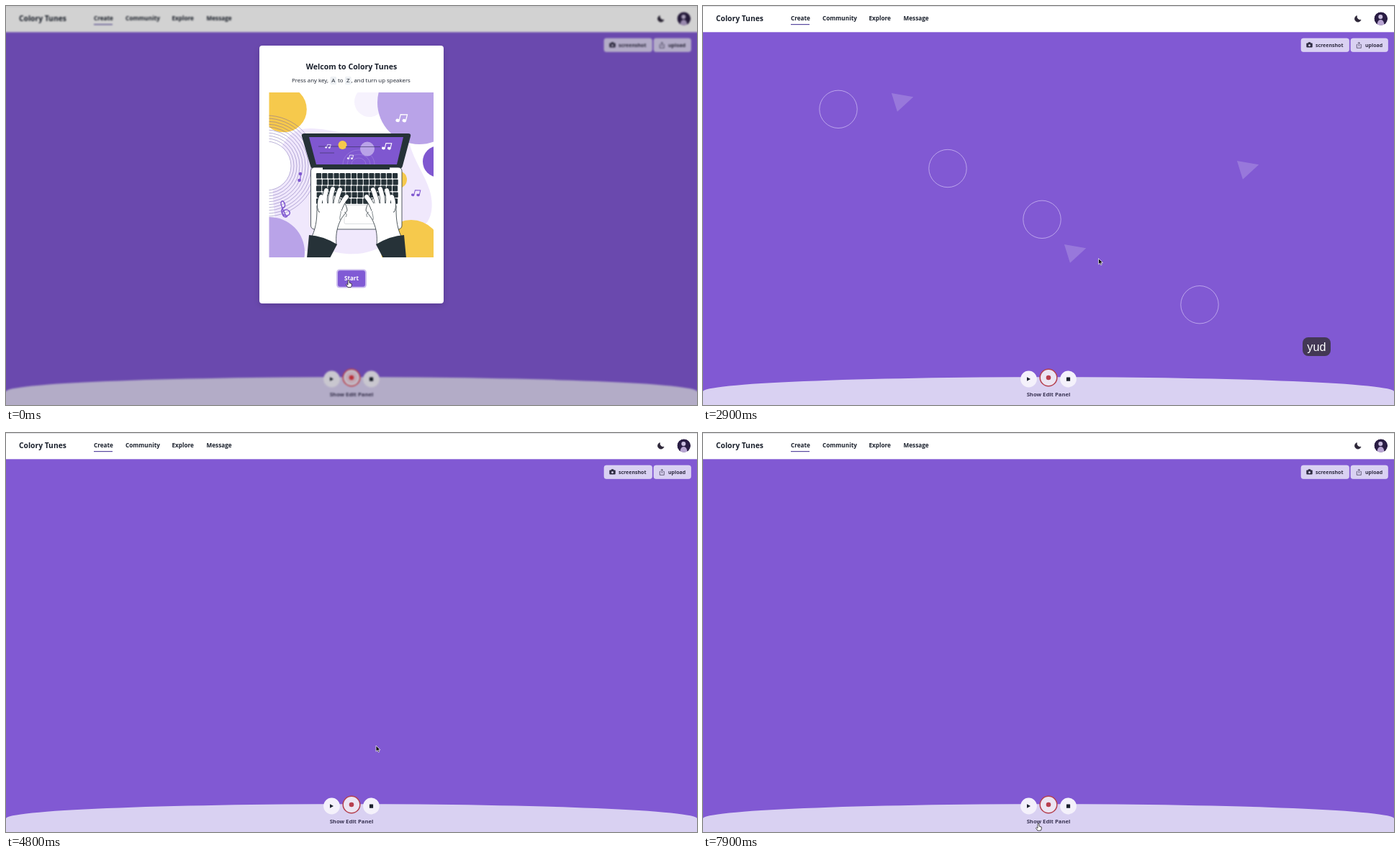
An HTML page with a canvas that plays this animation: 960x554 px, repeating every 8 s.

```html
<!DOCTYPE html>
<html lang="en">
<head>
<meta charset="utf-8">
<title>Colory Tunes</title>
<style>
  html, body { margin: 0; width: 100%; height: 100%; overflow: hidden; background: #8159d3; }
  #stage { position: relative; width: 960px; height: 554px; overflow: hidden; background: #8159d3; }
  canvas, svg { position: absolute; left: 0; top: 0; }
  text { font-family: "Open Sans", "Noto Sans", sans-serif; fill: #1a202c; }
  .bold { font-weight: 700; }
  .mid { text-anchor: middle; }
  .keys {
    position: absolute; left: 833px; height: 26px; padding: 0 6.3px; border-radius: 8px;
    background: rgba(47, 46, 43, .75); color: #fff; white-space: pre;
    font: 16.2px/27px "Liberation Sans", Arial, sans-serif;
  }
</style>
</head>
<body>
<div id="stage">
  <canvas id="fx" width="960" height="554"></canvas>
  <svg id="ui" width="960" height="554" viewBox="0 0 960 554">
    <defs>
      <clipPath id="art"><rect x="365.500" y="120" width="228.500" height="229"/></clipPath>
      <clipPath id="face"><circle cx="941.800" cy="17.600" r="9.400"/></clipPath>
      <filter id="soft" x="-20%" y="-20%" width="140%" height="140%">
        <feGaussianBlur stdDeviation="4"/>
      </filter>
      <g id="note" transform="rotate(14)">
        <ellipse cx="-4" cy="4" rx="2.800" ry="2.200"/><ellipse cx="5" cy="2" rx="2.800" ry="2.200"/>
        <path d="M-2 4V-5L7-7V2" fill="none" stroke="currentColor" stroke-width="1.300"/>
      </g>
      <g id="hand">
        <path d="M425 320C432 305 432 291 432 278C434 266 445 261 456 263C466 266 474 276 474 284C470 290 466 294 464 299C459 310 458 320 459 332Z"
          fill="#fff" stroke="#263238" stroke-width=".8"/>
        <g id="fingers" fill="none" stroke-linecap="round">
          <path d="M437 283Q434 274 438 265M444 278Q441 267 445 256M451 276Q450 265 454 254M458 276Q460 264 464 255M463 283Q467 272 473 265"/>
        </g>
        <path d="M436 274H466V288H436Z" fill="#fff"/>
        <path d="M464 297C463 292 466 288 465 285M470 286Q475 289 472 293" fill="none" stroke="#263238" stroke-width=".6"/>
        <path d="M421 318Q440 319 460 331L450 350H418Z" fill="#263238"/>
      </g>
    </defs>

    <g id="page">
      <path d="M-10 570V535.200H0A480 20 0 0 1 960 535.200H970V570Z" fill="#f7fafc" fill-opacity=".75"/>
      <rect x="-10" y="-10" width="980" height="46.300" fill="#fff"/>
      <rect x="-10" width="980" height="1" fill="#dedee2"/>
      <text class="bold" x="18" y="21" font-size="10.300">Colory Tunes</text>
      <g class="bold" font-size="8.200">
        <text x="122" y="20.300">Create</text>
        <text x="166" y="20.300">Community</text>
        <text x="230.500" y="20.300">Explore</text>
        <text x="278.500" y="20.300">Message</text>
      </g>
      <rect x="122" y="25" width="26" height="1.200" fill="#5a4aa0"/>
      <path d="M908.300 13.600A4.400 4.400 0 1 0 914 19.300A4.800 4.800 0 0 1 908.300 13.600Z"
        fill="#2d2638" stroke="#2d2638" stroke-width=".8" stroke-linejoin="round"/>
      <g clip-path="url(#face)">
        <circle cx="941.800" cy="17.600" r="9.400" fill="#2a1d44"/>
        <circle cx="941.300" cy="15" r="3" fill="#cbbfe0"/>
        <path d="M936.500 28Q936.500 19 941.500 19T946.500 28Z" fill="#b9a6d3"/>
      </g>

      <g fill="#f7fafc" fill-opacity=".75" stroke="#e4dcf8" stroke-width=".6">
        <rect x="831" y="45" width="66.500" height="18.500" rx="3"/>
        <rect x="900" y="45" width="51.500" height="18.500" rx="3"/>
      </g>
      <rect x="838.300" y="51.500" width="8.400" height="6" rx="1" fill="#2d2a40"/>
      <rect x="840.800" y="50.300" width="3.400" height="2" rx=".6" fill="#2d2a40"/>
      <circle cx="842.500" cy="54.600" r="1.700" fill="#d9d2f0" stroke="#2d2a40" stroke-width=".4"/>
      <path d="M909.500 53.500H908.300V58.300H914.300V53.500H913M911.300 56V50.300M909.600 52L911.300 50.300L913 52"
        fill="none" stroke="#4a4560" stroke-width=".8"/>
      <g class="bold" font-size="7">
        <text x="851" y="56.500" style="fill:#2d2a40">screenshot</text>
        <text x="920" y="56.500" style="fill:#2d2a40">upload</text>
      </g>

      <g fill="#f4f1fb">
        <circle cx="452.500" cy="518" r="11.400"/>
        <circle cx="507.500" cy="518" r="11.400"/>
      </g>
      <path d="M450 515.300L455 518L450 520.800Z" fill="#1a202c"/>
      <rect x="504.900" y="515.500" width="5.200" height="5.200" rx=".5" fill="#1a202c"/>
      <circle id="ring" cx="480" cy="516" r="11.800" fill="#ece5f3" stroke-width="1.500"/>
      <circle id="glow" cx="480" cy="516" r="8" fill="#f26d7d"/>
      <circle id="dot" cx="480" cy="516" r="3.300"/>
      <text class="bold mid" x="480" y="542.300" font-size="7.700" style="fill:#3b3555">Show Edit Panel</text>
    </g>

    <text id="hint" class="mid" x="480" y="226" font-size="6.700" style="fill:#fff">Press A to Z, and turn up speakers</text>

    <g id="tip">
      <rect x="478.500" y="534.500" width="57.500" height="14.500" rx="1.500" fill="#718096"/>
      <text class="mid" x="507" y="544.300" font-size="6.900" style="fill:#fff">stop recording</text>
    </g>

    <g id="modal">
      <rect width="960" height="554" fill-opacity=".175"/>
      <rect x="352" y="58" width="256" height="357" rx="4" fill-opacity=".17" filter="url(#soft)"/>
      <rect x="352" y="55" width="256" height="358" rx="4" fill="#fff"/>
      <text class="bold mid" x="480" y="88" font-size="10.600">Welcom to Colory Tunes</text>
      <g fill="#edf0f3">
        <rect x="450.500" y="98" width="8.600" height="11" rx="1.500"/>
        <rect x="471" y="98" width="8.600" height="11" rx="1.500"/>
      </g>
      <g font-size="7.900">
        <text x="397" y="106.300">Press any key,</text>
        <text class="mid" x="454.800" y="106.300">A</text>
        <text x="461" y="106.300">to</text>
        <text class="mid" x="475.200" y="106.300">Z</text>
        <text x="479.500" y="106.300">, and turn up speakers</text>
      </g>

      <g clip-path="url(#art)">
        <path d="M392 182C410 162 440 172 470 176L560 190C572 230 596 250 591 285C585 318 560 305 535 325C500 352 470 345 440 338C395 350 375 320 372 280C368 240 372 205 392 182Z" fill="#f0e8fc"/>
        <circle cx="505" cy="133" r="21" fill="#f6f2fd"/>
        <circle cx="386" cy="143.500" r="31.800" fill="#f6c94c"/>
        <circle cx="574" cy="134" r="58" fill="#b9a3e8"/>
        <circle cx="601" cy="216" r="22" fill="#7f57d0"/>
        <circle cx="545" cy="241" r="12" fill="#f6c94c"/>
        <circle cx="563" cy="339" r="42" fill="#f6c94c"/>
        <circle cx="366" cy="342" r="49" fill="#b9a3e8"/>
        <circle cx="362" cy="222" r="34" fill="#fff"/>
        <g id="waves" fill="none" stroke="#6a58a8" stroke-width=".45"></g>

        <path d="M414 177H559Q563 177 562 181L551 222Q550 226 546 226H428Q424 226 423 222L411 181Q410 177 414 177Z" fill="#263238"/>
        <path d="M421 182H552L543 220H431Z" fill="#7f57d0"/>
        <g fill="none" stroke="#a98fe0" stroke-width=".5">
          <path d="M480 220A10 9 0 0 1 500 220M474 220A16 14 0 0 1 506 220M468 220A22 20 0 0 1 512 220"/>
        </g>
        <circle cx="467.500" cy="193" r="6" fill="#f6c94c"/>
        <circle cx="502" cy="198.500" r="10" fill="#b9a3e8"/>
        <path d="M434 195H462M472 195.500H520M436 204H456" stroke="#3d3466" stroke-width=".7"/>
        <rect x="423.500" y="224" width="126.500" height="86" rx="5" fill="#fff" stroke="#263238" stroke-width=".8"/>
        <rect x="440" y="223" width="93" height="4" fill="#263238"/>
        <g id="board" fill="#263238"></g>
        <rect x="470" y="276.500" width="44" height="26" rx="2" fill="#fff" stroke="#b8bcc2" stroke-width=".5"/>
        <use href="#hand"/>
        <use href="#hand" transform="translate(974) scale(-1 1)"/>

        <g fill="#fff" color="#fff">
          <use href="#note" x="549" y="156"/>
          <use href="#note" transform="translate(528.500 195) scale(.85)"/>
          <use href="#note" transform="translate(478 210) scale(.55)"/>
          <use href="#note" transform="translate(447 195) scale(.5)"/>
        </g>
        <g fill="#7f57d0" color="#7f57d0">
          <use href="#note" transform="translate(569 260) scale(.8)"/>
          <circle cx="409" cy="233" r="2.300"/><circle cx="407.500" cy="242" r="2.300"/>
          <path d="M409 233V242" stroke="currentColor"/>
        </g>
        <path d="M391 292C386 296 381 287 386 284C393 280 398 289 391 291C382 291 380 283 387 279C389 275 384 267 382 273C381 278 389 289 389 293"
          fill="none" stroke="#7f57d0" stroke-width="1.500"/>
      </g>

      <rect x="459" y="365.500" width="42" height="26" rx="4.500" fill="#cbbcee"/>
      <rect x="461" y="367.300" width="38" height="22.400" rx="3" fill="#805ad5"/>
      <text class="bold mid" x="480" y="381.300" font-size="8" style="fill:#fff">Start</text>
    </g>

    <g id="arrow">
      <path d="M0 0V8.200L2 6.500L3.300 9.300L4.700 8.600L3.400 6H6Z" fill="#111" stroke="#fff" stroke-width=".7"/>
      <g id="block" fill="none" stroke="#8f8b9c" stroke-width="1">
        <circle cx="4.500" cy="13" r="4"/><path d="M1.700 10.200L7.300 15.800"/>
      </g>
    </g>
    <path id="point" d="M-1 .7Q0-.4 1 .7V4L4.200 5V8L3.200 10H-1.200L-3.500 6.500L-2.500 5.500L-1 6.800Z"
      fill="#fff" stroke="#222" stroke-width=".8"/>
  </svg>
  <div class="keys" id="upper" style="top:428px"></div>
  <div class="keys" id="lower" style="top:460px"></div>
</div>

<script>
const LOOP = 8000;
const $ = id => document.getElementById(id);
const g = $('fx').getContext('2d');
const clamp = v => Math.max(0, Math.min(1, v));
const span = (t, a, b) => clamp((t - a) / (b - a));
const smooth = p => p * p * (3 - 2 * p);
const out = p => 1 - (1 - p) * (1 - p);
const show = (id, alpha) => $(id).setAttribute('opacity', alpha);

// Static repeats of the illustration
for (let r = 34; r <= 70; r += 4)
  $('waves').innerHTML += `<circle cx="362" cy="222" r="${r}"/>`;
for (let row = 0; row < 5; row++)
  for (let col = 0; col < 14; col++)
    $('board').innerHTML += `<rect x="${431 + col * 8.15 + (row % 2) * .6}" y="${232 + row * 8.8}" width="7.2" height="7.6" rx="1"/>`;
const fingers = $('fingers').innerHTML;
$('fingers').innerHTML = `<g stroke="#263238" stroke-width="7.4">${fingers}</g><g stroke="#fff" stroke-width="6">${fingers}</g>`;

// Effects: each draws itself from its progress p
const TOP = 36, FOOT = 554, SLOPE = 519 / 960;

const effects = {
  wipe(p) {
    const h = FOOT - TOP, rise = p * 2;
    g.fillStyle = '#f6c94c';
    if (rise < 1) {
      g.globalAlpha = Math.min(1, rise * 1.06);
      g.fillRect(0, FOOT - h * rise, 960, h * rise);
    } else {
      const left = 2 - rise;
      g.globalAlpha = Math.sqrt(left);
      g.fillRect(0, TOP, 960, h * left);
    }
  },
  rings(p, xs) {
    const r = 81 * out(p);
    g.globalAlpha = p < .6 ? .85 : .85 * (1 - p) / .4;
    g.strokeStyle = '#d9c9f8';
    g.lineWidth = r * .03;
    for (const x of xs) circle(x, x * SLOPE + 41.7, r, 'stroke');
  },
  dots(p, xs) {
    g.globalAlpha = 1 - p;
    g.fillStyle = '#f6c94c';
    for (const x of xs) circle(x, x * SLOPE + 58, 36.3 * Math.sin(Math.PI * p), 'fill');
  },
  triangles(p, spots) {
    const grow = out(clamp(p / .3));
    g.globalAlpha = .19 * clamp((1 - p) / .25);
    g.fillStyle = '#fff';
    for (const [x, y] of spots) {
      g.save();
      g.translate(x + 13, y + 11);
      g.rotate((grow - 1) * 1.6);
      g.scale(grow, grow);
      g.beginPath();
      g.moveTo(-13, -11);
      g.lineTo(18, -4);
      g.lineTo(-6, 16);
      g.fill();
      g.restore();
    }
  },
  line(p, [x1, y1, x2, y2]) {
    const head = clamp(p * 2), tail = clamp(p * 2 - 1);
    const at = k => [x1 + (x2 - x1) * k, y1 + (y2 - y1) * k];
    g.globalAlpha = .75;
    g.strokeStyle = '#4d4089';
    g.lineWidth = 2.5;
    g.beginPath();
    g.moveTo(...at(tail));
    g.lineTo(...at(head));
    g.stroke();
  }
};

function circle(x, y, r, paint) {
  g.beginPath();
  g.arc(x, y, r, 0, 7);
  g[paint]();
}

// [start, duration, effect, data]
const score = [
  [2740, 650, 'triangles', [[262, 120], [502, 330], [742, 214]]],
  [2830, 400, 'rings', [188, 340, 471, 690]],
  [2960, 300, 'dots', [250, 530]],
  [3571, 406, 'wipe'],
  [3620, 406, 'wipe'],
  [3560, 300, 'dots', [413]],
  [3601, 400, 'rings', [213.5, 252, 367, 415, 636]],
  [3727, 300, 'dots', [307, 422]],
  [3812, 400, 'rings', [300, 358, 444, 607, 617]],
  [5180, 400, 'rings', [230, 395, 588]],
  [5260, 300, 'dots', [320, 610]],
  [5420, 650, 'triangles', [[550.5, 175], [838, 252.5], [646, 490.5]]],
  [6820, 650, 'triangles', [[837.5, 86.5], [501.5, 211], [213.5, 278], [309.5, 376.5]]],
  [6890, 460, 'line', [368, 36, 144, 557.5]]
];

// Typed keys: [start, text above, text below]
const typed = [
  [0, '', ''], [2740, '', 'y'], [2830, '', 'yu'], [2900, '', 'yud'], [2960, '', 'yudo'],
  [3560, 'yudo', 'gh'], [3600, 'yudo', 'ghf'], [3630, 'yudo', 'ghfj'], [3690, 'yudo', 'ghfjd'],
  [3812, 'yudo', 'ghfjdn'], [4800, '', ''],
  [5180, '', 'yu'], [5260, '', 'yui'], [5330, '', 'yuis'], [5420, '', 'yuisd'], [5500, '', 'yuisdf'],
  [6300, '', '']
];

// Cursor stops: [time, x, y]
const path = [
  [0, 476, 380.5], [1150, 476, 380.5], [1700, 549.5, 350.5], [4550, 549.5, 350.5],
  [5050, 479, 516.5], [6300, 479, 516.5], [6800, 509.5, 524], [7300, 509.5, 524],
  [7750, 466, 542], [8000, 466, 542]
];

function setKeys(id, text) {
  const box = $(id);
  box.textContent = text;
  box.style.display = text ? '' : 'none';
}

function moveCursor(t) {
  const i = path.findIndex(s => s[0] > t);
  const [a, x, y] = path[i - 1], [b, x2, y2] = path[i];
  const k = smooth(span(t, a, b));
  const move = `translate(${x + (x2 - x) * k} ${y + (y2 - y) * k})`;
  const hand = t < 1250 || t > 6600;
  $('arrow').setAttribute('transform', move);
  $('point').setAttribute('transform', move);
  show('arrow', hand ? 0 : 1);
  show('point', hand ? 1 : 0);
  show('block', t > 5500 && t < 5900 ? 1 : 0);
}

function draw(t) {
  g.clearRect(0, 0, 960, 554);
  for (const [start, life, name, data] of score) {
    const p = (t - start) / life;
    if (p > 0 && p < 1) effects[name](p, data);
  }

  const open = 1 - span(t, 1000, 1200);
  show('modal', open);
  $('page').style.filter = open ? `blur(${.9 * open}px)` : 'none';
  show('hint', t < 1500 ? .6 * span(t, 1200, 1500) : .6 * (1 - span(t, 1500, 2300)));

  const live = t < 1200 || t > 5550 && t < 7300;
  $('ring').setAttribute('stroke', live ? '#e0444f' : '#b4404f');
  $('dot').setAttribute('fill', live ? '#e23a45' : '#b8404f');
  show('glow', t < 1200 ? .2 * open : live ? .4 * (1 - span(t, 5700, 6300)) : 0);
  show('tip', span(t, 6850, 6950) * (1 - span(t, 7400, 7550)));

  const keys = typed.filter(k => k[0] <= t).pop();
  setKeys('upper', keys[1]);
  setKeys('lower', keys[2]);
  moveCursor(t);
}

const begin = performance.now();
function tick() {
  draw((performance.now() - begin) % LOOP);
  requestAnimationFrame(tick);
}
tick();
</script>
</body>
</html>
```
